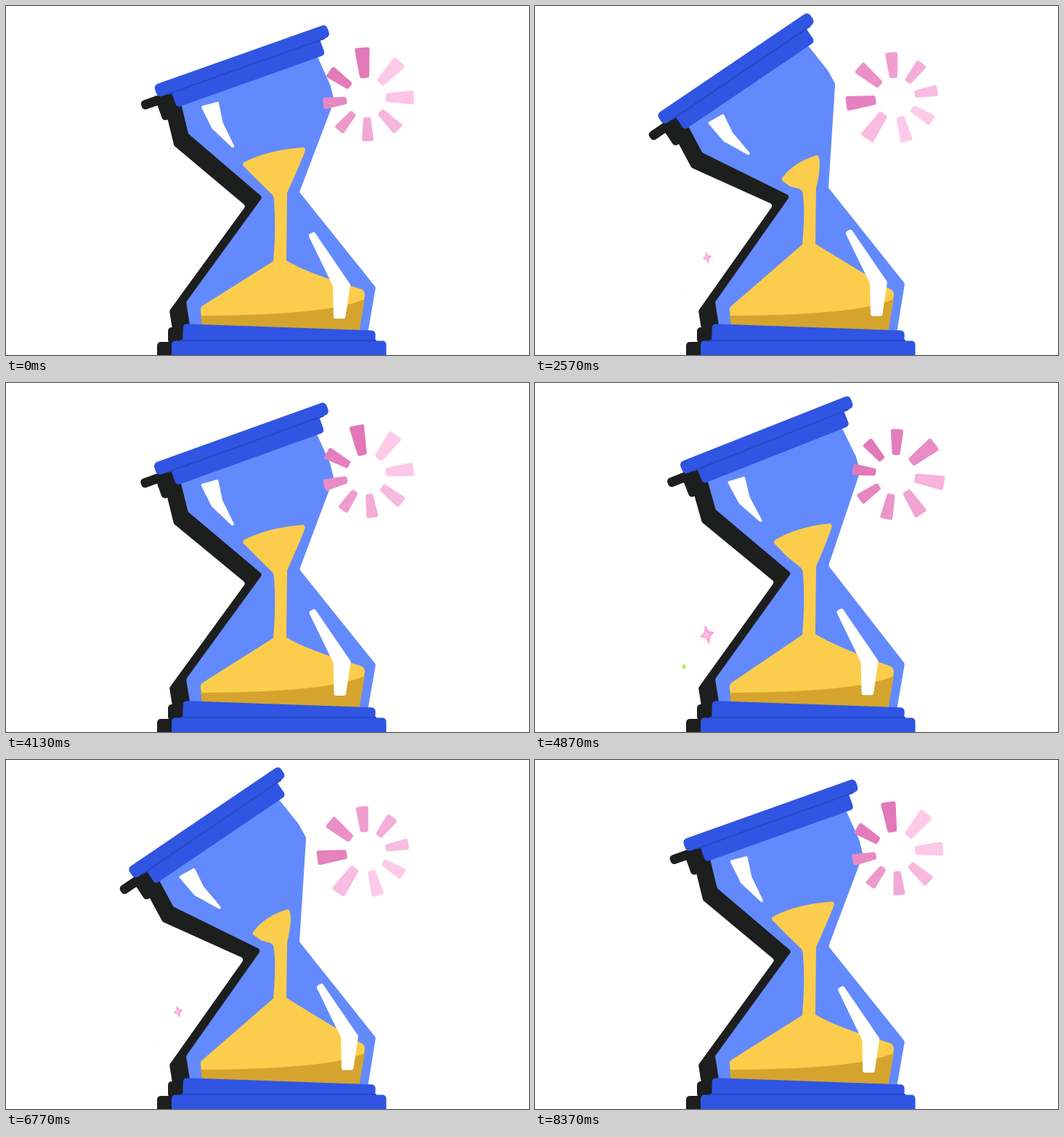
These frames come from a looping animation (720x480 px, 8410 ms). An HTML page with a canvas:

```html
<!DOCTYPE html>
<html lang="en">
<head>
<meta charset="utf-8">
<title>Hourglass</title>
<style>
html, body { margin: 0; width: 100%; height: 100%; overflow: hidden; background: #fff; }
canvas { display: block; }
</style>
</head>
<body>
<canvas id="stage" width="720" height="480"></canvas>
<script>
const ctx = document.getElementById('stage').getContext('2d');
const { PI, sin, cos, abs, min, max } = Math, TAU = 2 * PI;
const CYCLE = 4205;
const BLUE = '#2f55e2', LINE = '#2448c6', DARK = '#1d1e1e', WHITE = '#fff';

// lean: how far the top has tipped over; stretch: taller going out, squashed coming back
let lean, stretch, head, waistL, waistR;

function setPose(phase) {
  const bump = (from, to, size) =>
    phase > from && phase < to ? size * sin(PI * (phase - from) / (to - from)) : 0;
  const p = phase - bump(0, 2, .1) - bump(3.84, TAU, .3);
  lean = (1 - cos(p)) / 2;
  stretch = sin(p);
  head = {
    x: 203 - 38.4 * lean + 3.2 * stretch,
    y: 109 + 38.8 * lean - 9 * stretch,
    angle: (19.5 + 15.7 * lean - 1.1 * stretch) * PI / 180
  };
  const rise = 9.5 * lean + 3.7 * stretch;
  waistL = [353 - 2 * lean, 263 - .3 * rise];
  waistR = [404, 256 - rise];
}

// Stage position of a point given along and below the cap
function onHead(u, v) {
  const c = cos(head.angle), s = sin(head.angle);
  return [head.x + u * c + v * s, head.y - u * s + v * c];
}

const mid = (a, b, dx, dy) => [(a[0] + b[0]) / 2 + dx, (a[1] + b[1]) / 2 + dy];

function blob(pts, color, radius) {
  const n = pts.length;
  ctx.beginPath();
  ctx.moveTo(...mid(pts[n - 1], pts[0], 0, 0));
  pts.forEach((p, i) => ctx.arcTo(...p, ...pts[(i + 1) % n], radius));
  ctx.closePath();
  ctx.fillStyle = color;
  ctx.fill();
}

function box(x, y, w, h, color, radius = 5) {
  ctx.beginPath();
  ctx.roundRect(x, y, w, h, radius);
  ctx.fillStyle = color;
  ctx.fill();
}

function placed(x, y, angle, paint) {
  ctx.save();
  ctx.translate(x, y);
  ctx.rotate(angle);
  paint();
  ctx.restore();
}

const onCap = paint => placed(head.x, head.y, -head.angle, paint);

// (du, dv) shifts the upper bulb along the cap, (dx, dy) the lower bulb on the stage
function drawGlass(color, du = 0, dv = 0, dx = 0, dy = 0) {
  const upper = (u, v) => onHead(u + du, v + dv);
  const lower = (x, y) => [x + dx, y + dy];
  blob([
    upper(28, 30), upper(23, 79), lower(...waistL),
    lower(248, 407), lower(254, 445), lower(498, 450),
    lower(509, 387 - 6 * lean), lower(...waistR),
    upper(227.5, 103), upper(229.5, 82), upper(226, 38)
  ], color, 4);
}

function drawShadow() {
  onCap(() => {
    box(-25, 15, 150, 13, DARK, 5);
    box(-4, 20, 150, 31, DARK, 5);
  });
  drawGlass(DARK, -24, 9, -23, 12);
  box(223, 442, 60, 22, DARK);
  box(208, 462, 60, 40, DARK);
}

function drawSand() {
  const tip = [324 + 16.5 * lean, 217 + 22 * lean - 4 * stretch];
  const corner = [412 - 22.9 * lean + 1.2 * stretch, 194 + 9.5 * lean - 4 * stretch];
  const crest = mid(tip, corner, -9, -7);
  const neck = [387, waistR[1] + 1];
  const foot = 350 - 26 * lean;

  ctx.beginPath();
  ctx.moveTo(...mid(tip, waistL, 6, -2));
  ctx.arcTo(...tip, ...crest, 3);
  ctx.quadraticCurveTo(...crest, corner[0] - 4, corner[1] + .5);
  ctx.quadraticCurveTo(...corner, corner[0], corner[1] + 5);
  ctx.quadraticCurveTo(...mid(corner, neck, 5, -7), ...neck);
  ctx.lineTo(386, foot);
  ctx.quadraticCurveTo(413, foot + 17, 488, 389);
  ctx.quadraticCurveTo(494, 391, 494, 397);
  ctx.lineTo(486, 448);
  ctx.lineTo(271, 446);
  ctx.lineTo(268, 419);
  ctx.quadraticCurveTo(267, 415, 271, 412);
  ctx.lineTo(368, foot + 1);
  ctx.quadraticCurveTo(372, foot - 45, 369, neck[1] + 10);
  ctx.quadraticCurveTo(369, neck[1] + 4, 365, neck[1] + 1);
  ctx.closePath();
  ctx.fillStyle = '#fccd4c';
  ctx.fill();

  ctx.beginPath();
  ctx.moveTo(268, 426);
  ctx.bezierCurveTo(375, 425, 455, 420, 494, 403);
  ctx.lineTo(486, 448);
  ctx.lineTo(271, 446);
  ctx.fillStyle = '#d4a42f';
  ctx.fill();
}

function drawShine() {
  blob([onHead(52, 49), onHead(77, 51), onHead(73, 80), onHead(78, 126), onHead(56, 83)], WHITE, 2);
  placed(9.5 * lean - 4 * stretch, -4 * lean, 0, () =>
    blob([[416, 315], [424, 310], [474, 383], [467, 430], [451, 430], [450, 385]], WHITE, 3));
}

function drawBars() {
  onCap(() => {
    box(20, 10, 217, 29.5, BLUE);
    box(0, 0, 252, 18, BLUE, 6);
    box(14, 17, 230, 2, LINE, 1);
  });
  placed(244, 437, .036, () => box(0, 0, 265, 26, BLUE));
  box(228, 460.5, 295.5, 30, BLUE);
  box(240, 459, 270, 2, LINE, 1);
}

// Rays fade to and fro one after the other while the ring turns once per cycle
function drawSpinner(t) {
  for (let i = 0; i < 8; i++) {
    const gap = abs(t - (8 - i) % 8 * 304);
    const swing = min(gap, CYCLE - gap) / (CYCLE / 2);
    const light = max(0, min(1, 1.25 * swing - .15));
    const color = `rgb(${226 + 28 * light}, ${120 + 82 * light}, ${184 + 49 * light})`;
    const angle = 265 + 45 * i + 5 * sin(PI * i / 5) + 360 * t / CYCLE;
    const length = 37 + 5 * cos(PI * i / 5), w = length / 4, n = w * .6, r = 27;
    placed(496, 126, angle * PI / 180, () =>
      blob([[r, -n], [r + length, -w], [r + length, w], [r, n]], color, 3));
  }
}

// Slanted four-pointed star
function star(x, y, size, color) {
  const pts = Array.from({ length: 8 }, (_, i) => {
    const r = size * (i % 2 ? .42 : 1), u = r * cos(i * PI / 4), v = r * sin(i * PI / 4);
    return [x + 28 * u + 9 * v, y - 8.5 * u + 39 * v];
  });
  blob(pts, color, 2.5 * size);
}

function drawStars(t) {
  const glow = end => 1.05 * max(0, sin(PI * min(1, max(0, (t - 400) / (end - 400)))));
  const pink = glow(2740);
  star(237, 346, pink, '#fca5d8');
  star(236, 346, .42 * pink, '#fdc6e7');
  star(205, 390, .35 * glow(2600), '#a9f04c');
}

function draw(now) {
  const t = now % CYCLE;
  setPose(TAU * t / CYCLE);
  ctx.fillStyle = WHITE;
  ctx.fillRect(0, 0, 720, 480);
  drawShadow();
  drawGlass('#638afd');
  drawSand();
  drawShine();
  drawBars();
  drawSpinner(t);
  drawStars(t);
}

const start = performance.now();
function tick() {
  draw(performance.now() - start);
  requestAnimationFrame(tick);
}
tick();
</script>
</body>
</html>
```
